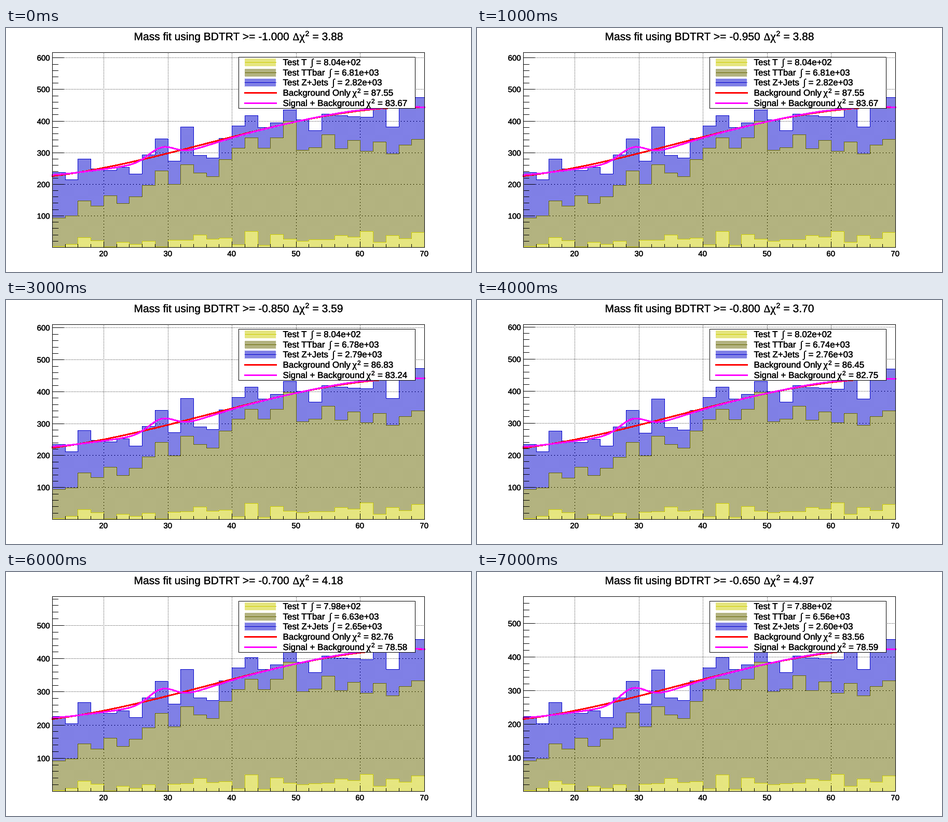
A matplotlib script that plays this animation: 896 px wide and 472 px high, repeating every 8000 ms.

```python
import numpy as np
import matplotlib.pyplot as plt
from matplotlib.animation import FuncAnimation
from matplotlib.colors import to_rgba
from matplotlib.patches import Rectangle
from matplotlib.patheffects import withStroke

W, H, DPI = 896, 472, 100
LEFT, RIGHT, TOP, BOTTOM = 89, 806, 47, 424
X_MIN, X_MAX, BINS = 12, 70, 29
PX = 72 / DPI
SANS, SERIF = "Liberation Sans", "Liberation Serif"
BLUE, OLIVE, YELLOW = "#0000cc", "#666600", "#cccc00"
RED, MAGENTA = "#ff0000", "#ff00ff"

# axis maximum, yields of T, TTbar and Z+Jets, chi2 without and with signal
STAGES = [
    (617.0, 804, 6810, 2820, 87.55, 83.67),
    (617.0, 804, 6810, 2820, 87.55, 83.67),
    (617.0, 804, 6800, 2820, 87.48, 83.94),
    (610.5, 804, 6780, 2790, 86.83, 83.24),
    (607.5, 802, 6740, 2760, 86.45, 82.75),
    (604.8, 800, 6690, 2730, 86.078, 82.274),
    (587.2, 798, 6630, 2650, 82.76, 78.58),
    (580.0, 788, 6560, 2600, 83.56, 78.59),
]
YIELDS = STAGES[0][1:4]

# Stacked heights per bin at the loosest cut; every later cut scales them.
TOTAL = np.array([
    237, 214, 280, 249, 244, 254, 232, 293, 344, 273, 381, 291, 283, 345, 385,
    417, 380, 394, 435, 404, 370, 422, 417, 414, 412, 540, 381, 540, 475])
TTBAR = np.array([
    94, 100, 147, 131, 164, 139, 161, 196, 242, 200, 262, 236, 225, 278, 315,
    347, 315, 347, 400, 308, 316, 357, 312, 338, 304, 334, 296, 324, 342])
noise = np.random.default_rng(4).normal(0, 11, BINS)
TOP_QUARK = np.clip(11 + np.arange(BINS) + noise, 2, 60)

FIT = np.polyfit([12, 20, 30, 40, 50, 60, 70],
                 [226, 252, 298, 350, 398, 433, 444], 4)

rows, cols = np.mgrid[0:H, 0:W]
checker = (rows + cols) % 2 == 0
inside = (cols >= LEFT) & (cols <= RIGHT) & (rows < BOTTOM)
column_bin = np.clip((np.arange(W) - LEFT) * BINS // (RIGHT - LEFT), 0, BINS - 1)

fig = plt.figure(figsize=(W / DPI, H / DPI), dpi=DPI, facecolor="white")
ax = fig.add_axes([0, 0, 1, 1])


def to_x(value):
    return LEFT + (np.asarray(value) - X_MIN) * (RIGHT - LEFT) / (X_MAX - X_MIN)


def stroke(xs, ys, color="black", z=5, width=1):
    ax.plot(xs, ys, color=color, lw=width * PX, antialiased=False, snap=False,
            solid_joinstyle="miter", zorder=z)


def write(x, y, text, size, font=SANS, ha="left", weight=0.4):
    ax.text(x, y, text, fontsize=size * PX, family=font, ha=ha,
            va="baseline", color="black", zorder=9,
            path_effects=[withStroke(linewidth=weight * PX, foreground="black")])


def blank():
    return np.zeros((H, W, 4))


def show(image, z):
    ax.imshow(image, interpolation="nearest", aspect="auto", zorder=z)


def draw_axes(to_y, y_max, image):
    for v in range(0, int(y_max) + 1, 20):
        y = round(float(to_y(v)))
        major = v % 100 == 0
        stroke([LEFT, LEFT + (22 if major else 11)], [y, y])
        if major and v:
            image[y, LEFT:RIGHT:3] = to_rgba("black")
            write(84.5, y + 5.5, str(v), 15, ha="right")
    for v in range(X_MIN, X_MAX + 1, 2):
        x = round(float(to_x(v)))
        major = v % 10 == 0
        stroke([x, x], [BOTTOM, BOTTOM - (11 if major else 6)])
        if major:
            image[BOTTOM:TOP:-3, x] = to_rgba("black")
            write(x - 0.7, 441, str(v), 15, ha="center")
    stroke([LEFT, RIGHT, RIGHT, LEFT, LEFT], [TOP, TOP, BOTTOM, BOTTOM, TOP])


def draw_stack(to_y, layers, image):
    edges = np.round(to_x(np.linspace(X_MIN, X_MAX, BINS + 1)))
    for heights, color in layers:
        tops = np.round(to_y(heights))
        mask = inside & (rows >= tops[column_bin][None, :])
        image[mask & checker] = to_rgba(color)
        stroke(np.repeat(edges, 2)[1:-1], np.repeat(tops, 2), color, z=3)


def draw_fits(to_y, scale, stage):
    x = np.linspace(X_MIN, X_MAX, 120)
    base = np.polyval(FIT, x) * scale
    peak = 37 + 4 * max(0, stage - 5) / 2
    signal = (base + peak * np.exp(-0.5 * ((x - 29) / 2) ** 2)
              - 13 * np.exp(-((x - 29) / 9) ** 2)
              + 4 * np.exp(-(x - 12) / 4)
              + 2 * np.exp(-((x - 59) / 6) ** 2))
    stroke(to_x(x), to_y(base), RED, 4, 2)
    stroke(to_x(x), to_y(signal), MAGENTA, 4, 2)


def draw_legend(yields, chis):
    ax.add_patch(Rectangle((448, 56), 340, 99, fc="white", ec="none", zorder=6))
    stroke([448, 788, 788, 448, 448], [56, 56, 155, 155, 56], z=8)

    centres = [66, 86, 105, 125, 145]
    image = blank()
    names = ("Test T", "Test TTbar", "Test Z+Jets")
    for y, name, x, value, color in zip(centres, names, (587, 622, 628), yields,
                                        (YELLOW, OLIVE, BLUE)):
        box = (cols >= 460) & (cols < 520) & (abs(rows - y) <= 7)
        image[box & checker] = to_rgba(color)
        stroke([460, 520], [y, y], color, z=8)
        write(533, y + 5.5, name, 17)
        write(x, y + 5.5, "\u222b", 18, SERIF)
        write(x + 10, y + 5.5, f"= {value:.2e}", 17)
    show(image, 7)

    names = ("Background Only", "Signal + Background")
    for y, name, x, value, color in zip(centres[3:], names, (667, 694), chis,
                                        (RED, MAGENTA)):
        stroke([460, 520], [y, y], color, z=8, width=2)
        write(533, y + 5.5, name, 17)
        write(x, y + 5.5, "\u03c7", 19, SERIF)
        write(x + 9.5, y, "2", 12)
        write(x + 21.5, y + 5.5, f"= {value:.2f}", 17)


def draw_title(cut, delta):
    x, y = 246, 23
    write(x, y, f"Mass fit using BDTRT >= {cut:.3f}", 21, weight=0.2)
    write(x + 306, y, "\u0394", 20, SERIF)
    write(x + 319, y, "\u03c7", 23, SERIF)
    write(x + 330, y - 8, "2", 14)
    write(x + 344, y, f"= {delta:.2f}", 21, weight=0.2)


def update(stage):
    ax.clear()
    ax.axis("off")
    y_max, *yields, chi_bg, chi_sig = STAGES[stage]
    keep_t, keep_tt, keep_z = np.divide(yields, YIELDS)

    def to_y(value):
        return BOTTOM - np.asarray(value) * (BOTTOM - TOP) / y_max

    ttbar = TTBAR * keep_tt
    total = ttbar + (TOTAL - TTBAR) * keep_z
    plot = blank()
    draw_axes(to_y, y_max, plot)
    draw_stack(to_y, [(total, BLUE), (ttbar, OLIVE),
                      (TOP_QUARK * keep_t, YELLOW)], plot)
    show(plot, 2)
    draw_fits(to_y, sum(yields) / sum(YIELDS), stage)
    draw_legend(yields, (chi_bg, chi_sig))
    draw_title(-1 + 0.05 * stage, chi_bg - chi_sig)
    ax.set_xlim(-0.5, W - 0.5)
    ax.set_ylim(H - 0.5, -0.5)
    return []


anim = FuncAnimation(fig, update, frames=len(STAGES), interval=1000,
                     init_func=lambda: [], repeat=True, repeat_delay=0)
plt.show()
```
